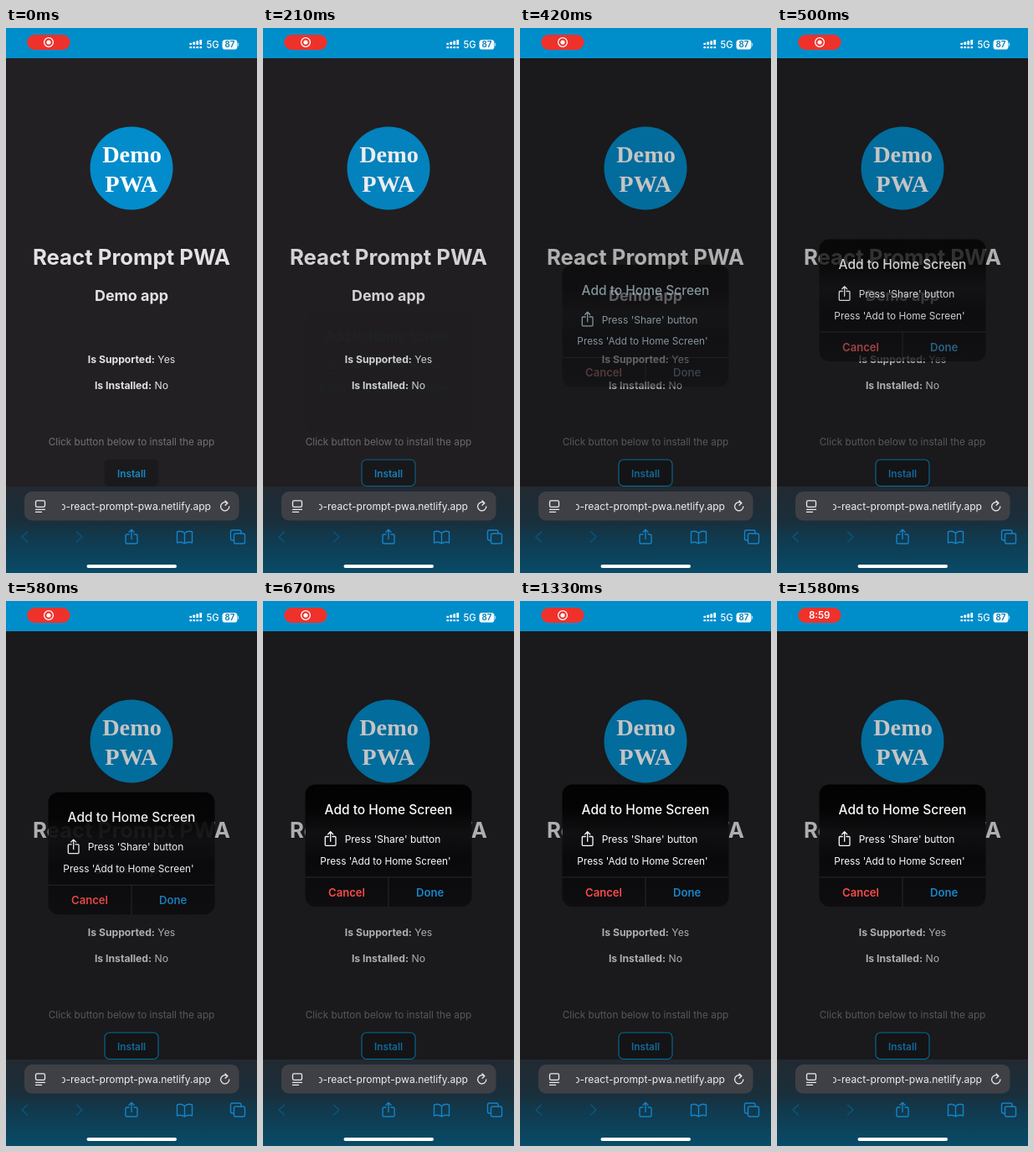
Animation of 300 by 649 pixels, one loop 1620 ms. Source, as an HTML page:

```html
<!DOCTYPE html>
<html lang="en">
<head>
<meta charset="utf-8">
<title>Install prompt</title>
<style>
html, body { margin: 0; width: 100%; height: 100%; overflow: hidden; background: #222023; }
svg { display: block; width: 100vw; height: 100vh; }
text { font-family: Inter, "Liberation Sans", sans-serif; }
.mid { text-anchor: middle; }
.bold { font-weight: 700; }
.semi { font-weight: 600; }
.med { font-weight: 500; }
.serif { font: bold 28.3px "Liberation Serif", serif; }
.line { fill: none; stroke-linecap: round; stroke-linejoin: round; }
</style>
</head>
<body>
<svg viewBox="0 0 300 649" xmlns="http://www.w3.org/2000/svg">
  <defs>
    <linearGradient id="barFill" x1="0" y1="0" x2="0" y2="1">
      <stop offset="0" stop-color="#222931"/>
      <stop offset=".4" stop-color="#1a2f3b"/>
      <stop offset=".58" stop-color="#11394d"/>
      <stop offset="1" stop-color="#084b68"/>
    </linearGradient>
    <linearGradient id="cardFill" x1="0" y1="0" x2="0" y2="1">
      <stop offset="0" stop-color="#020203"/>
      <stop offset=".2" stop-color="#040405"/>
      <stop offset=".4" stop-color="#101012"/>
      <stop offset=".6" stop-color="#09090b"/>
      <stop offset="1" stop-color="#0e0e10"/>
    </linearGradient>
    <clipPath id="urlClip"><rect x="67" y="555" width="183" height="28"/></clipPath>
  </defs>

  <!-- page -->
  <rect width="300" height="649" fill="#222023"/>
  <circle cx="150" cy="167" r="49.5" fill="#038ccb"/>
  <g class="mid" fill="#fff">
    <text class="serif" x="150.5" y="160">Demo</text>
    <text class="serif" x="149.8" y="195">PWA</text>
  </g>
  <g class="mid" fill="#e2e2e3">
    <text class="bold" x="150" y="281.5" font-size="25.75">React Prompt PWA</text>
    <text class="bold" x="150" y="325" font-size="17.9">Demo app</text>
    <text x="150" y="398.7" font-size="12.2"><tspan class="bold">Is Supported:</tspan> Yes</text>
    <text x="150" y="429.7" font-size="12.2"><tspan class="bold">Is Installed:</tspan> No</text>
  </g>
  <text class="mid" x="150" y="497" font-size="11.8" fill="#727174">Click button below to install the app</text>
  <rect x="117.5" y="513.5" width="65" height="32.5" rx="6" fill="#1a1a1c"/>
  <rect id="ring" x="118" y="514" width="64" height="31.5" rx="5.5" fill="none" stroke="#0790cc" stroke-width="1.1"/>
  <text class="mid semi" x="150" y="534.5" font-size="11.8" fill="#1788c8">Install</text>
  <rect id="shade" y="36" width="300" height="510" fill="#000"/>

  <!-- prompt card -->
  <g id="card">
    <g id="panel">
      <rect x="50.5" y="218.5" width="199" height="145.5" rx="12" fill="url(#cardFill)"/>
      <path d="M50.5 329H249.5M150 329V364" stroke="#29292c" stroke-width="1"/>
    </g>
    <g id="copy" class="mid">
      <text class="med" x="150" y="254" font-size="15.5">Add to Home Screen</text>
      <text x="155" y="288.2" font-size="12">Press 'Share' button</text>
      <text x="146.5" y="313.5" font-size="11.8">Press 'Add to Home Screen'</text>
    </g>
    <path id="cardShare" class="line" stroke-width="1.3" d="M78.3 280.5H75.3Q74.3 280.5 74.3 281.5V290.3Q74.3 291.3 75.3 291.3H86Q87 291.3 87 290.3V281.5Q87 280.5 86 280.5H83M80.7 286.3V275M77.7 277.8L80.7 274.8L83.7 277.8"/>
    <g class="mid semi" font-size="13.1">
      <text id="cancel" x="100" y="351.7">Cancel</text>
      <text id="done" x="199.7" y="351.7">Done</text>
    </g>
  </g>

  <!-- status bar -->
  <rect width="300" height="36" fill="#008ecb"/>
  <rect x="25.2" y="8" width="51.4" height="18" rx="9" fill="#ef312b"/>
  <g id="rec">
    <circle cx="51" cy="17" r="5.4" fill="none" stroke="#fff" stroke-width="1.3"/>
    <circle cx="51" cy="17" r="2.6" fill="#fff"/>
  </g>
  <text id="clock" class="mid semi" x="50.7" y="21.2" font-size="11.6" fill="#fff">8:59</text>
  <g id="signal" fill="#fff"></g>
  <text class="med" x="239.5" y="24" font-size="11.2" fill="#fff">5G</text>
  <rect x="258.5" y="14" width="18" height="11.5" rx="3.6" fill="#f4fafd"/>
  <path d="M277.6 18V21.6" stroke="#a5d6ec" stroke-width="1.2"/>
  <text class="mid semi" x="267.5" y="23.4" font-size="9.8" fill="#087cb0">87</text>

  <!-- browser bar -->
  <rect y="546" width="300" height="103" fill="url(#barFill)"/>
  <rect x="22" y="552" width="256.5" height="34.5" rx="9" fill="#3f4046"/>
  <g class="line" stroke="#ececee" stroke-width="1.3">
    <rect x="35.5" y="562.8" width="11" height="7.6" rx="1.6"/>
    <path d="M35.5 573.3H46.5M35.5 576.4H42.5"/>
    <path d="M264.6 565.6A5.1 5.1 0 1 0 266.8 570M262 563L264.9 565.7L262 568.2"/>
  </g>
  <g clip-path="url(#urlClip)">
    <text x="245" y="574" font-size="12.1" text-anchor="end" fill="#ececee">demo-react-prompt-pwa.netlify.app</text>
  </g>
  <g class="line" stroke="#0d547c" stroke-width="1.4">
    <path d="M25.5 600L19 606L25.5 612M84.5 600L91 606L84.5 612"/>
  </g>
  <g class="line" stroke="#1583c8" stroke-width="1.4">
    <path d="M147 603H144.5Q143 603 143 604.5V612.5Q143 614 144.5 614H155.5Q157 614 157 612.5V604.5Q157 603 155.5 603H153M150 608.5V597.5M147 600.3L150 597.3L153 600.3"/>
    <path d="M213.5 601.5Q209.5 598 204.5 600V613Q209.5 611 213.5 614Q217.5 611 222.5 613V600Q217.5 598 213.5 601.5V614"/>
    <path d="M272 610H270.5Q268.5 610 268.5 608V600Q268.5 598 270.5 598H279Q281 598 281 600V602"/>
    <rect x="272.5" y="602" width="13" height="12" rx="2"/>
  </g>
  <rect x="96.5" y="639" width="107.5" height="4" rx="2" fill="#fff"/>
</svg>
<script>
const LOOP = 1620, STEP = 125 / 3;
const GRAY = [115, 112, 115];
const el = id => document.getElementById(id);
const set = (id, attrs) => {
  for (const k in attrs) el(id).setAttribute(k, attrs[k]);
};
const smooth = (t, start, length) => {
  const x = Math.min(1, Math.max(0, (t - start) / length));
  return x * x * (3 - 2 * x);
};
const mix = (a, b, u) => `rgb(${a.map((v, i) => Math.round(v + (b[i] - v) * u))})`;

for (let i = 0; i < 4; i++) {
  const x = 219.3 + i * 4, h = 2.2 + i * 1.3;
  el('signal').innerHTML +=
    `<rect x="${x}" y="${20 - h}" width="2.8" height="${h}" rx=".7"/>` +
    `<rect x="${x}" y="22" width="2.8" height="2.3" rx=".7"/>`;
}

// Hold each picture for one 24 fps step, with starts rounded to 10 ms.
function hold(t) {
  let k = Math.ceil(t / STEP);
  while (k > 0 && Math.round(k * 25 / 6) * 10 > t) k--;
  return k * STEP;
}

function draw(now) {
  const t = hold(now % LOOP);
  const p = smooth(t, 187, 478);
  const ink = mix([25, 140, 190], [250, 250, 250], smooth(p, 0.2, 0.4));
  const inkAlpha = Math.pow(p, 0.6);
  const tint = smooth(p, 0.2, 0.8);

  set('ring', { opacity: smooth(t, 70, 220) });
  set('shade', { opacity: 0.23 * smooth(t, 120, 240) });
  set('card', { transform: `translate(0 ${120 * (1 - p)})` });
  set('panel', { opacity: p });
  set('copy', { fill: ink, opacity: inkAlpha });
  set('cardShare', { stroke: ink, opacity: inkAlpha });
  set('cancel', { fill: mix(GRAY, [250, 75, 72], tint), opacity: p });
  set('done', { fill: mix(GRAY, [24, 134, 200], tint), opacity: p });

  const swap = smooth(t, 1400, 150);
  set('rec', { opacity: 1 - swap });
  set('clock', { opacity: swap });
}

function tick() {
  draw(performance.now());
  requestAnimationFrame(tick);
}
tick();
</script>
</body>
</html>
```
